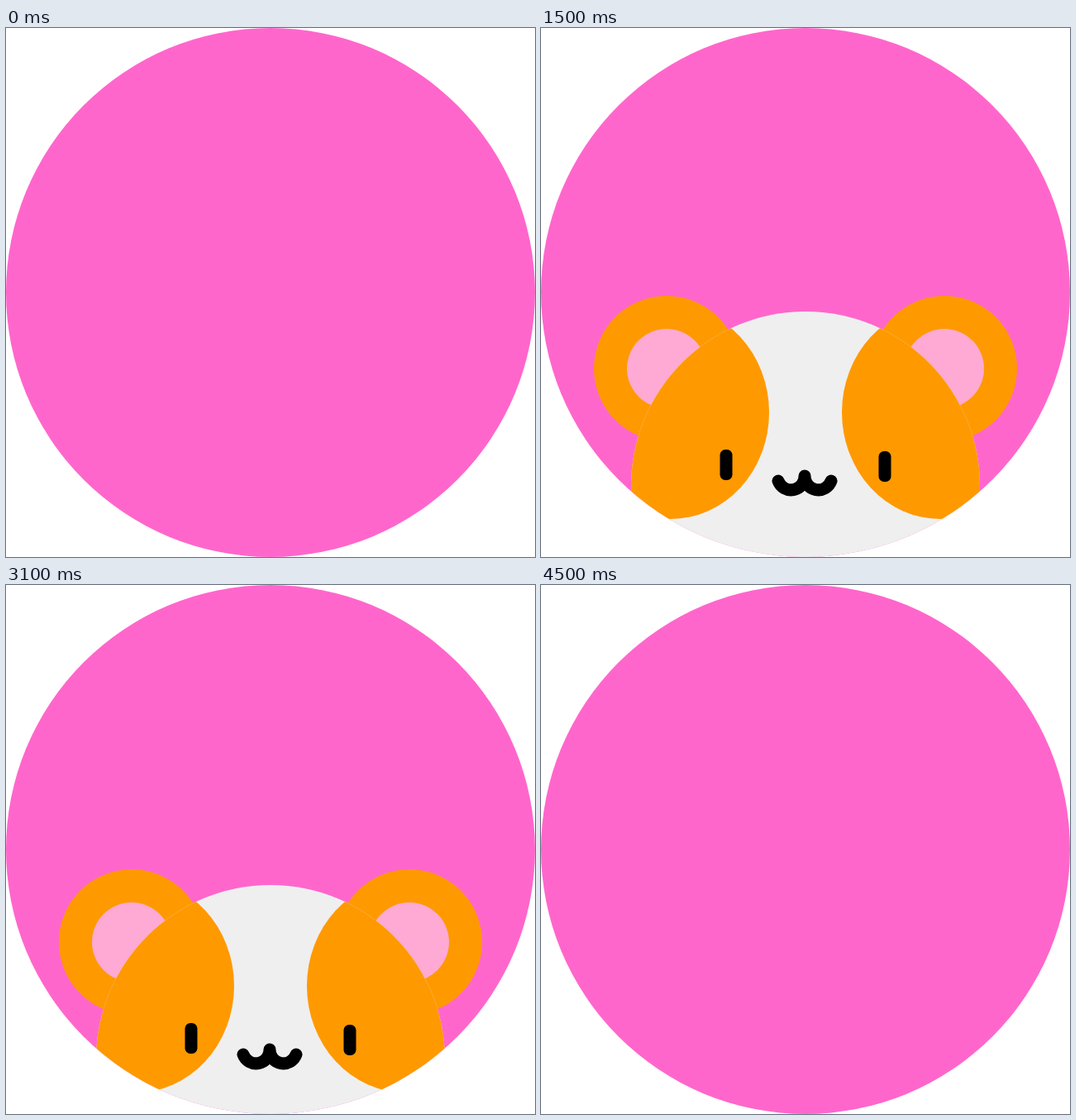
An HTML page that plays this animation: 640x640 px, repeating every 4.6 s.

```html
<!DOCTYPE html>
<html lang="en">
<head>
<meta charset="utf-8">
<title>Peeking hamster</title>
<style>
  html, body { margin: 0; width: 100%; height: 100%; overflow: hidden; background: #fff; }
  svg { display: block; width: 100vw; height: 100vh; }
</style>
</head>
<body>
<svg viewBox="0 0 640 640">
  <defs>
    <clipPath id="porthole"><circle cx="320" cy="320" r="320"/></clipPath>
    <clipPath id="face"><circle cx="320" cy="494" r="211"/></clipPath>
    <g id="ear">
      <circle r="88" fill="#ff9900"/>
      <circle r="48" fill="#ffaad4"/>
    </g>
  </defs>
  <circle cx="320" cy="320" r="320" fill="#ff66cc"/>
  <g clip-path="url(#porthole)">
    <g id="hamster" transform="translate(0 360)">
      <use href="#ear" x="152" y="352"/>
      <use href="#ear" x="488" y="352"/>
      <circle cx="320" cy="494" r="211" fill="#efefef"/>
      <g clip-path="url(#face)" fill="#ff9900">
        <ellipse cx="157" cy="405" rx="119" ry="129"/>
        <ellipse cx="483" cy="405" rx="119" ry="129"/>
      </g>
      <rect x="216.5" y="450" width="15" height="37" rx="6.5"/>
      <rect x="408.5" y="452" width="15" height="37" rx="6.5"/>
      <path d="M287 488A16.5 16.5 0 0 0 319 482A16.5 16.5 0 0 0 351 488"
            fill="none" stroke="#000" stroke-width="15" stroke-linecap="round" stroke-linejoin="round"/>
    </g>
  </g>
</svg>
<script>
  const LOOP = 4600, TICK = 100, STEP = 20;
  const RISE_TICKS = 18, FALL_START = 27;
  const hamster = document.getElementById('hamster');
  const start = performance.now();

  // Rise in even steps, rest at the top, then sink at the same pace.
  function offsetAt(time) {
    const tick = Math.floor(time / TICK);
    return STEP * Math.max(RISE_TICKS - tick, 0, Math.min(tick - FALL_START, RISE_TICKS));
  }

  function draw(now) {
    const time = Math.max(0, now - start) % LOOP;
    hamster.setAttribute('transform', `translate(0 ${offsetAt(time)})`);
    requestAnimationFrame(draw);
  }
  requestAnimationFrame(draw);
</script>
</body>
</html>
```
